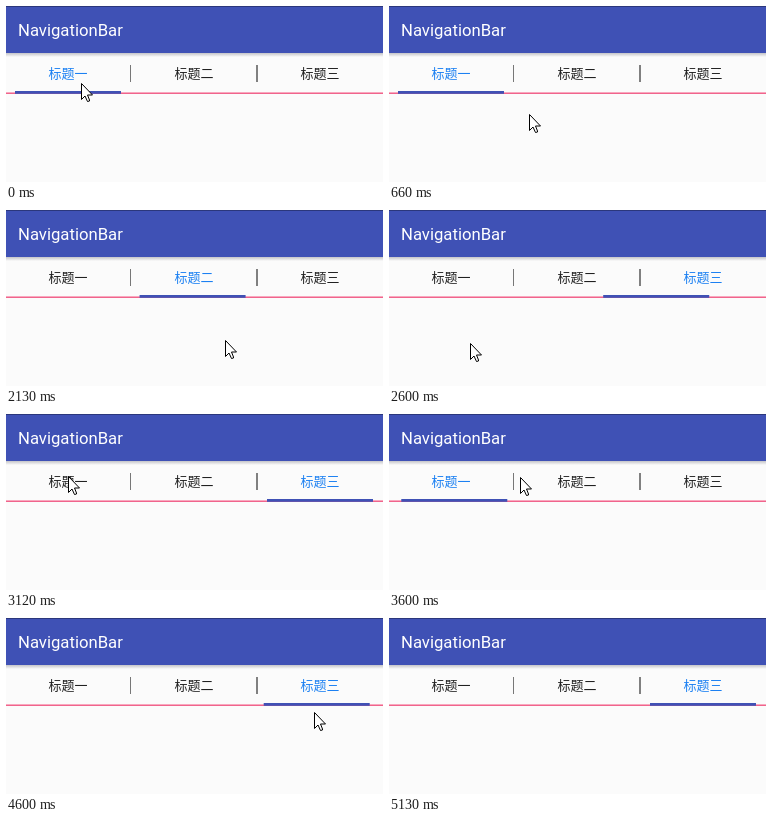
Write an HTML page with a canvas that moves like this. It is 377 by 176 pixels and loops after 5560 ms.

```html
<!DOCTYPE html>
<html lang="zh-CN">
<head>
<meta charset="utf-8">
<title>NavigationBar</title>
<style>
html, body { margin: 0; width: 100%; height: 100%; overflow: hidden; background: #fbfbfb; }
#stage { position: relative; width: 377px; height: 176px; overflow: hidden; }
#stage > * { position: absolute; }
header {
  left: 0; top: 0; width: 377px; height: 47px; box-sizing: border-box;
  background: #3f51b5; border-top: 1px solid #2b377c;
}
.shadow { left: 0; top: 47px; width: 377px; height: 4px; background: linear-gradient(#c4c4c8, #fbfbfb); }
h1 {
  left: 12px; top: 14px; margin: 0; color: #fff; white-space: nowrap;
  font: 400 16.7px/21px Roboto, sans-serif;
}
.tab {
  top: 59px; width: 60px; text-align: center; white-space: nowrap; color: #212121;
  font: 13px/16px "Noto Sans CJK SC", "Noto Sans CJK", sans-serif;
}
.tab.on { color: #1c80f2; }
.divider { top: 59px; width: 1px; height: 17px; background: #777; }
.divider.wide { width: 2px; background: #808080; }
.line { left: 0; top: 86px; width: 377px; height: 1px; background: #f8a8be; border-bottom: 1px solid #f0648c; }
canvas { left: 0; top: 0; }
</style>
</head>
<body>
<div id="stage">
  <header></header>
  <div class="shadow"></div>
  <h1>NavigationBar</h1>
  <div class="tab" style="left:32px">标题一</div>
  <div class="tab" style="left:158px">标题二</div>
  <div class="tab" style="left:284px">标题三</div>
  <div class="divider" style="left:124px"></div>
  <div class="divider wide" style="left:250px"></div>
  <div class="line"></div>
  <canvas width="377" height="176"></canvas>
</div>
<script>
const LOOP = 5560, STEP = 58, WIDTH = 377, HEIGHT = 176, TAB = 126, BAR = 106;
const ctx = document.querySelector('canvas').getContext('2d');
const tabs = [...document.querySelectorAll('.tab')];

const linear = u => u;
const smooth = u => u * u * (3 - 2 * u);
const slow = u => 1 - (1 - u) ** 1.7;
const settle = u => 1 - (1 - Math.min(u, 1)) ** 5;

// Spans of movement; the screen rests between them.
const spans = [[430, 1300], [1550, 3120], [3420, 4000], [4430, 5130]];

// Pointer moves: start, end, x, y, easing
const home = [75, 77];
const moves = [
  [372, 660, 140, 108, linear],
  [660, 1300, 218, 134, slow],
  [1520, 1790, 115, 138, smooth],
  [1790, 2130, 219, 130, smooth],
  [2130, 2640, 78, 133, smooth],
  [2640, 3100, 62, 62, smooth],
  [3420, 4000, 292, 65, linear],
  [4430, 5120, 354, 180, linear]
];

// Each scroll settles on a page; "drag" is when the finger touched down.
const scrolls = [
  { drag: 1550, start: 1790, time: 600, page: 1 },
  { drag: 2130, start: 2540, time: 480, page: 2 },
  { drag: 3420, start: 3420, time: 300, page: 0 },
  { drag: 4430, start: 4430, time: 300, page: 2 }
];

const tabX = page => 9 + page * TAB;

function snap(t) {
  const span = spans.filter(s => s[0] <= t).pop();
  if (!span) return 0;
  return Math.min(span[1], span[0] + STEP * Math.floor((t - span[0] + 4) / STEP));
}

function pointer(t) {
  let [x, y] = home;
  for (const [start, end, toX, toY, ease] of moves) {
    if (t <= start) break;
    const u = ease(Math.min(1, (t - start) / (end - start)));
    x += (toX - x) * u;
    y += (toY - y) * u;
  }
  return [Math.round(x), Math.round(y)];
}

function barX(t, n = scrolls.length - 1) {
  if (n < 0) return tabX(0);
  const s = scrolls[n];
  if (t < s.drag) return barX(t, n - 1);
  const from = barX(s.drag, n - 1);
  const held = Math.min(t, s.start);
  const x = from + (pointer(s.drag)[0] - pointer(held)[0]) * TAB / WIDTH;
  return t < s.start ? x : x + (tabX(s.page) - x) * settle((t - s.start) / s.time);
}

function selected(t) {
  const s = scrolls.filter(s => s.start <= t).pop();
  return s ? s.page : 0;
}

function drawPointer(x, y) {
  const points = [[0, 0], [0, 16], [3.5, 12.5], [6, 18], [8, 17.5], [8, 16.5], [6, 11.5], [11, 11.5]];
  ctx.beginPath();
  for (const [px, py] of points) ctx.lineTo(x + px + .5, y + py + .5);
  ctx.closePath();
  ctx.fillStyle = '#fff';
  ctx.fill();
  ctx.strokeStyle = '#000';
  ctx.lineWidth = 1;
  ctx.stroke();
}

function draw(now) {
  const t = snap(now % LOOP);
  const page = selected(t);
  tabs.forEach((tab, i) => tab.classList.toggle('on', i === page));
  ctx.clearRect(0, 0, WIDTH, HEIGHT);
  ctx.fillStyle = '#3f51b5';
  ctx.fillRect(barX(t), 85, BAR, 2.8);
  drawPointer(...pointer(t));
}

let begin;
function tick(now) {
  begin ??= now;
  draw(now - begin);
  requestAnimationFrame(tick);
}
draw(0);
requestAnimationFrame(tick);
</script>
</body>
</html>
```
